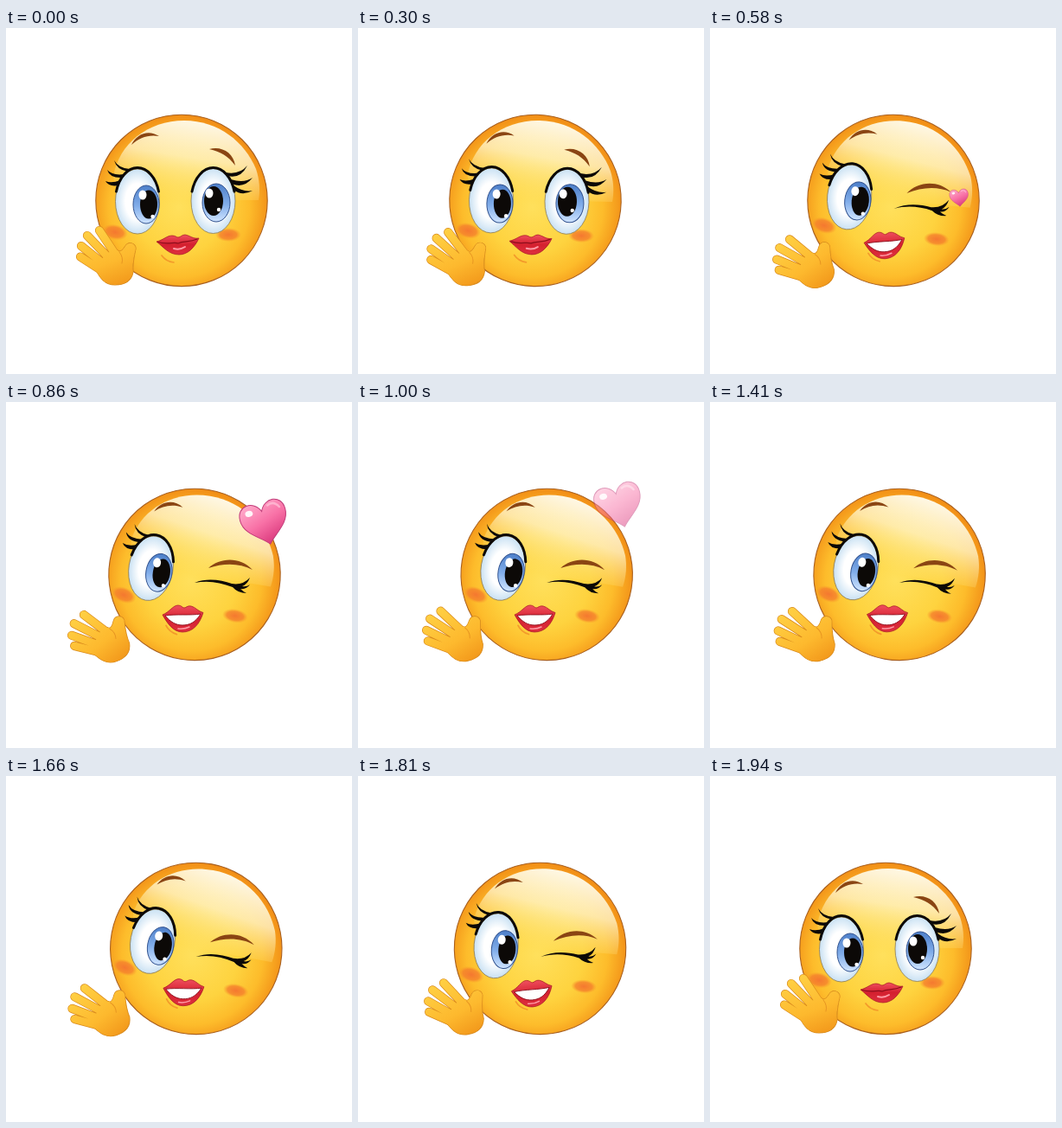
An HTML page for the animation above (2340 ms loop, 400 by 400 pixels).

```html
<!DOCTYPE html>
<html lang="en">
<head>
<meta charset="utf-8">
<title>Winking smiley</title>
<style>
  html, body { margin: 0; width: 100%; height: 100%; overflow: hidden; background: #fff; }
  svg { display: block; width: 100%; height: 100%; }
  .line { fill: none; stroke-linecap: round; stroke-linejoin: round; }
  .brow { fill: #8a4513; }
  .ink { fill: #0c0907; }
  .lid { fill: none; stroke: #0c0907; stroke-width: 3; stroke-linecap: round; }
  .white { fill: url(#white); stroke: #8c7a55; stroke-width: .8; }
  .iris { fill: url(#iris); stroke: #31528f; }
</style>
</head>
<body>
<svg viewBox="0 0 400 400">
  <defs>
    <radialGradient id="skin" gradientUnits="userSpaceOnUse" cx="200" cy="207" r="107">
      <stop offset="0" stop-color="#ffe05c"/>
      <stop offset=".5" stop-color="#fed33f"/>
      <stop offset=".76" stop-color="#fdbc2b"/>
      <stop offset="1" stop-color="#f18c15"/>
    </radialGradient>
    <linearGradient id="gloss" gradientUnits="userSpaceOnUse" x1="215" y1="107" x2="200" y2="200">
      <stop offset="0" stop-color="#fffdf0" stop-opacity=".95"/>
      <stop offset=".45" stop-color="#fff6cf" stop-opacity=".75"/>
      <stop offset="1" stop-color="#ffe77c" stop-opacity="0"/>
    </linearGradient>
    <radialGradient id="blush">
      <stop offset="0" stop-color="#f47430" stop-opacity=".95"/>
      <stop offset=".65" stop-color="#f5812c" stop-opacity=".8"/>
      <stop offset="1" stop-color="#f99a2a" stop-opacity="0"/>
    </radialGradient>
    <radialGradient id="white">
      <stop offset=".55" stop-color="#fff"/>
      <stop offset="1" stop-color="#c9e1f3"/>
    </radialGradient>
    <linearGradient id="iris" x1="0" y1="0" x2="0" y2="1">
      <stop offset="0" stop-color="#4d7fc9"/>
      <stop offset=".55" stop-color="#82aeea"/>
      <stop offset="1" stop-color="#cfe4ff"/>
    </linearGradient>
    <linearGradient id="lip" x1="0" y1="0" x2="0" y2="1">
      <stop offset="0" stop-color="#f0505f"/>
      <stop offset=".5" stop-color="#d4202f"/>
      <stop offset="1" stop-color="#de3040"/>
    </linearGradient>
    <linearGradient id="palm" gradientUnits="userSpaceOnUse" x1="104" y1="232" x2="128" y2="298">
      <stop offset="0" stop-color="#ffcf43"/>
      <stop offset=".6" stop-color="#fdb92e"/>
      <stop offset="1" stop-color="#f39a1c"/>
    </linearGradient>
    <linearGradient id="pink" x1=".2" y1="0" x2=".6" y2="1">
      <stop offset="0" stop-color="#ffa9ca"/>
      <stop offset=".5" stop-color="#f871a6"/>
      <stop offset="1" stop-color="#d9367b"/>
    </linearGradient>
    <path id="fingers" class="line" d="M126 261 108 234M118 265 94 240M112 272 87 252M113 282 86 264.500"/>
    <path id="back" d="M108 272C112 264 121 255 129 257C132 260 135 257 138 252C142 246 150 249 150 255C148 264 146 272 147 282C145 293 136 297 126 297C114 297 109 289 104 280Z"/>
  </defs>

  <g id="head">
    <circle cx="203" cy="199.400" r="99.200" fill="url(#skin)" stroke="#a9601f" stroke-width="1.100"/>
    <path fill="url(#gloss)" d="M124 172C130 134 164 107 206 107C246 107 276 132 289 163C293 175 294 187 292 199H130Z"/>
    <ellipse cx="126" cy="236" rx="15" ry="9" fill="url(#blush)" transform="rotate(12 126 236)"/>
    <ellipse cx="257" cy="239" rx="15" ry="8" fill="url(#blush)"/>
    <path class="line" d="M180 263Q185 270 194 271" stroke="#f39a2b" stroke-width="1.700"/>
    <path class="brow" d="M145 135C151 122 165 117 177 125C164 123 154 127 145 135Z"/>

    <g>
      <ellipse class="white" cx="152" cy="200.500" rx="25.500" ry="37.500"/>
      <ellipse class="iris" cx="162" cy="204" rx="15" ry="22"/>
      <ellipse class="ink" cx="165" cy="204" rx="10" ry="16.500"/>
      <ellipse cx="158" cy="193" rx="4.500" ry="5.500" fill="#fff"/>
      <circle cx="169.500" cy="218" r="2.200" fill="#fff"/>
      <path class="lid" d="M127.500 189A25.500 38 0 0 1 176.500 189"/>
      <path class="ink" d="M141 166Q128 164 125 153Q130 162 143 163ZM135 173Q120 174 117 164Q123 171 137 169ZM130 182Q119 184 115 177Q122 180 132 176Z"/>
    </g>

    <g id="openEye">
      <path class="brow" d="M235 140C249 136 263 144 265 159C257 148 248 143 235 140Z"/>
      <g id="lid">
        <ellipse class="white" cx="239.500" cy="200" rx="25.500" ry="37.500"/>
        <ellipse class="iris" cx="243" cy="202" rx="16" ry="22"/>
        <ellipse class="ink" cx="240" cy="200" rx="11" ry="17"/>
        <ellipse cx="235" cy="191" rx="4.500" ry="5.500" fill="#fff"/>
        <circle cx="246" cy="210" r="2.200" fill="#fff"/>
        <path class="lid" d="M215 189A25.500 38 0 0 1 264 189"/>
        <path class="ink" d="M254 167Q270 170 279 159Q271 175 256 171ZM260 175Q275 180 285 173Q275 186 261 180ZM263 182Q274 190 285 188Q273 195 263 187Z"/>
      </g>
    </g>
    <g id="closedLips">
      <path fill="url(#lip)" stroke="#a31522" stroke-width=".7" d="M174 247C182 245 186 240 192 240C196 240 197 242 199 242C202 242 203 239 207 239C213 240 216 244 223 243C218 254 210 262 200 262C188 262 182 253 174 247Z"/>
      <path class="line" stroke="#8c0d1b" stroke-width="1.300" d="M176 247.500C187 251 194 247 199 249C206 246 212 248 221 244"/>
      <path class="line" stroke="#ff9aa6" stroke-width="2" d="M194 255Q201 257 207 253"/>
    </g>

    <!-- Drawn as seen when the head is fully tilted -->
    <g id="winkFace" transform="rotate(-9.300 203 199.400) translate(-15 0)">
      <path class="brow" d="M234 192C247 180 270 178 285 194C270 186 252 186 234 192Z"/>
      <path class="ink" d="M218 209C233 203 249 206 261 210Q274 212 282 203Q279 211 273 213Q278 214 282 211Q278 217 271 216Q274 219 278 221Q268 221 262 214C247 208 233 206 218 209Z"/>
      <path fill="url(#lip)" stroke="#a31522" stroke-width=".7" d="M181 246C189 243 193 235 199 235C203 235 204 238 206 238C208 238 210 235 214 236C219 237 222 242 228 243.500C224 257 216 266 204 266C193 266 186 255 181 246Z"/>
      <path fill="#fff" stroke="#8c0d1b" stroke-width=".9" d="M184 247C196 245 214 247 225 245C219 255 212 258 204 258C196 258 190 254 184 247Z"/>
      <path class="line" stroke="#ff9aa6" stroke-width="1.500" d="M199 262Q206 263 212 260"/>
    </g>
  </g>

  <g id="heart">
    <path fill="url(#pink)" stroke="#c13a78" d="M0 26C-8 16-27 8-27-9C-27-27-6-28 0-13C6-28 27-27 27-9C27 8 8 16 0 26Z"/>
    <ellipse cx="-15" cy="-14" rx="4.500" ry="3.500" fill="#fff" opacity=".9"/>
    <path class="line" stroke="#ffc4da" stroke-width="2.500" opacity=".7" d="M8-18Q16-22 21-13"/>
  </g>

  <g id="hand">
    <use href="#fingers" stroke="#d98a1c" stroke-width="10.200"/>
    <use href="#back" stroke="#d98a1c" stroke-width="1.200"/>
    <use href="#fingers" stroke="url(#palm)" stroke-width="8.800"/>
    <use href="#back" fill="url(#palm)"/>
    <path class="line" stroke="#e79522" d="M131 259Q136 265 134 272"/>
  </g>
</svg>

<script>
const LOOP = 2340;
const ROLL_RADIUS = 92;
const el = id => document.getElementById(id);

// Tracks are [time, value] points, linear in between
const roll = [[0, 0], [300, 2], [580, 9], [860, 15], [1210, 15.5], [1660, 16.8], [1900, 2], [1940, 0]];
const wave = [[0, 0], [300, .2], [580, .88], [720, 1.12], [860, 1], [1210, .2], [1260, .2], [1460, .88], [1560, 1.12], [1660, .95], [1900, .2], [1940, 0]];
const lid = [[300, 0], [440, 1], [1810, 1], [1900, 0]];
const heart = {
  x: [[440, 282], [580, 288], [860, 299], [1070, 303]],
  y: [[440, 208], [580, 196], [860, 139], [1070, 109]],
  size: [[370, 0], [580, .4], [860, 1]],
  tilt: [[580, -6], [860, -15]],
  alpha: [[370, 0], [440, 1], [860, 1], [1140, 0]]
};

function at(track, t) {
  const next = track.findIndex(([time]) => time > t);
  if (next === 0) return track[0][1];
  if (next < 0) return track[track.length - 1][1];
  const [t0, a] = track[next - 1], [t1, b] = track[next];
  return a + (b - a) * (t - t0) / (t1 - t0);
}

// Poses are held for 70, 50 or 40 ms
function holdTime(t) {
  if (t < 300) return 0;
  if (t >= 1940) return 1940;
  const [start, step] = t < 1210 ? [300, 70] : t < 1860 ? [1210, 50] : [1860, 40];
  return start + Math.floor((t - start) / step) * step;
}

const show = (id, visible) => el(id).setAttribute("visibility", visible ? "visible" : "hidden");
const move = (id, transform) => el(id).setAttribute("transform", transform);

function draw(t) {
  const dx = at(roll, t), w = at(wave, t), shut = at(lid, t), winking = shut === 1;
  move("head", `translate(${dx} 0) rotate(${dx / ROLL_RADIUS * 180 / Math.PI} 203 199.4)`);
  move("hand", `translate(${-5.5 * w} ${4.5 * w}) rotate(${-19 * w} 124 275)`);
  move("lid", `translate(0 205) scale(1 ${1 - shut}) translate(0 -205)`);
  show("openEye", !winking);
  show("closedLips", !winking);
  show("winkFace", winking);

  const h = name => at(heart[name], t);
  move("heart", `translate(${h("x")} ${h("y")}) rotate(${h("tilt")}) scale(${h("size")})`);
  el("heart").setAttribute("opacity", h("alpha"));
}

const start = performance.now();
function tick() {
  draw(holdTime((performance.now() - start) % LOOP));
  requestAnimationFrame(tick);
}
tick();
</script>
</body>
</html>
```
